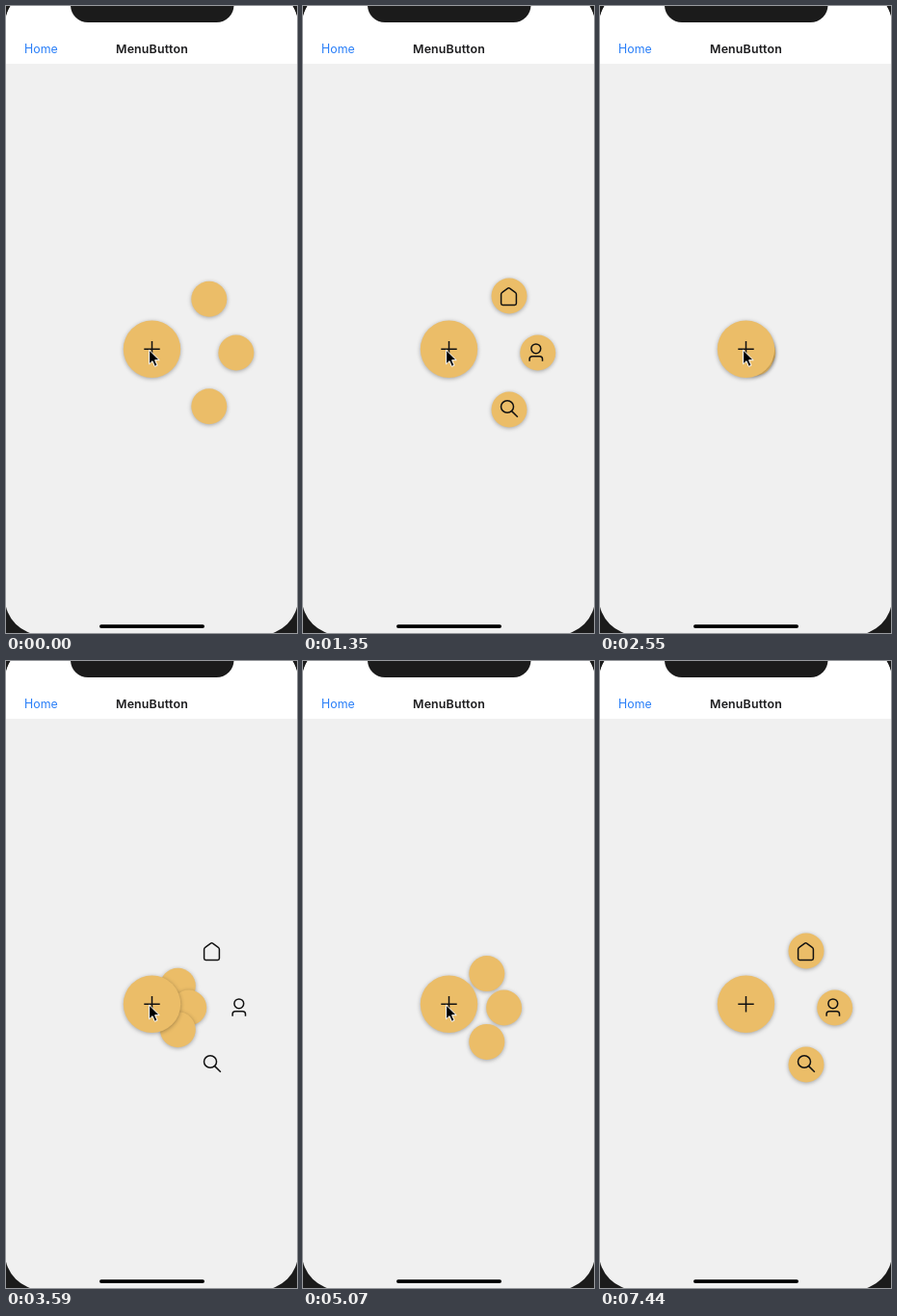
An HTML page that plays this animation: 302 px wide and 651 px high, repeating every 7.9 s.

```html
<!DOCTYPE html>
<html lang="en">
<head>
<meta charset="utf-8">
<title>MenuButton</title>
<style>
  html, body { margin: 0; width: 100%; height: 100%; overflow: hidden; background: #1b1b1b; }
  svg { display: block; }
  text { font: 12.4px Inter, "Open Sans", sans-serif; }
  .title { font-weight: 600; letter-spacing: .15px; }
  .button { fill: #ebbd68; filter: drop-shadow(0 1.6px 2.2px rgba(0, 0, 0, .32)); }
  .line { fill: none; stroke: #111; stroke-width: 1.5; stroke-linejoin: round; }
</style>
</head>
<body>
<svg width="302" height="651" viewBox="0 0 302 651">
  <clipPath id="screen"><rect x="-1" y="-18" width="304" height="671" rx="38"/></clipPath>
  <g clip-path="url(#screen)">
    <rect width="302" height="651" fill="#f0f0f0"/>
    <rect width="302" height="60" fill="#fff"/>
  </g>
  <rect x="67" y="-30" width="169.5" height="47" rx="18" fill="#1b1b1b"/>
  <text x="19" y="49" fill="#2a7ff8">Home</text>
  <text class="title" x="151.5" y="49" text-anchor="middle" fill="#1c1c1e">MenuButton</text>
  <rect x="97" y="642.2" width="109" height="3.8" rx="1.9"/>

  <circle class="button item" r="18.5"/>
  <circle class="button item" r="18.5"/>
  <circle class="button item" r="18.5"/>
  <g id="icons" class="line">
    <path d="M205.6 299.4q0-1.4 1.1-2.1l5.8-4.1q1-.7 2 0l5.8 4.1q1.1.7 1.1 2.1v9.4q0 1.7-1.7 1.7h-12.4q-1.7 0-1.7-1.7z"/>
    <circle cx="241.8" cy="355.8" r="4.9"/>
    <path d="M235.1 368.8v-2.2q0-2.9 2.9-2.9h7.6q2.9 0 2.9 2.9v2.2"/>
    <ellipse cx="212" cy="416" rx="6.5" ry="6.2"/>
    <path d="M216.6 420.6l6.2 6.2"/>
  </g>
  <circle class="button" cx="151.5" cy="356.3" r="29.7"/>
  <path class="line" d="M143.3 356.2h16.4M151.5 348v16.4"/>
  <path id="cursor" d="M0 0V14.6l3.4-3.1 2.4 5.6 2.6-1.1-2.4-5.5h4.6z" stroke="#fff" stroke-width="1" stroke-linejoin="round"/>
</svg>
<script>
  const LOOP = 7900, FADE = 370, MOVE = 300;
  const HUB = [156, 360];
  const SPOTS = [[214, 301], [243.7, 360], [214, 419]];
  // Times at which the items start to travel: in, out, in, out ...
  const MOVES = [-41, 920, 2304, 3452, 4930, 6098];
  const items = document.querySelectorAll('.item');
  const icons = document.getElementById('icons');
  const cursor = document.getElementById('cursor');

  const mix = (a, b, k) => a + (b - a) * k;
  const clamp = x => Math.min(1, Math.max(0, x));
  const ease = x => x < .5 ? (2 * x) ** 1.7 / 2 : 1 - (2 - 2 * x) ** 1.7 / 2;
  const progress = (t, start, length) => ease(clamp((t - start) / length));
  const place = (node, x, y) => node.setAttribute('transform', `translate(${x} ${y})`);

  // The screen refreshes about every 150 ms, slightly faster later on.
  function snap(t) {
    const [start, step] = t < 2692 ? [0, 150] : [2692, 148.1];
    return start + Math.floor((t - start) / step) * step;
  }

  function draw(t) {
    const index = MOVES.findLastIndex(start => t >= start - FADE);
    const start = MOVES[index];
    const toward = k => index % 2 ? k : 1 - k;
    const spread = toward(progress(t, start, MOVE));
    icons.setAttribute('opacity', toward(progress(t, start - FADE, FADE)));
    SPOTS.forEach(([x, y], i) =>
      place(items[i], mix(HUB[0], x, spread), mix(HUB[1], y, spread)));

    const leave = progress(t, 6930, 350);
    place(cursor, mix(148.6, 239.5, leave), mix(357.2, 607, leave));
    cursor.setAttribute('visibility', t < 7400 ? 'visible' : 'hidden');
  }

  function tick() {
    draw(snap(performance.now() % LOOP));
    requestAnimationFrame(tick);
  }
  tick();
</script>
</body>
</html>
```
